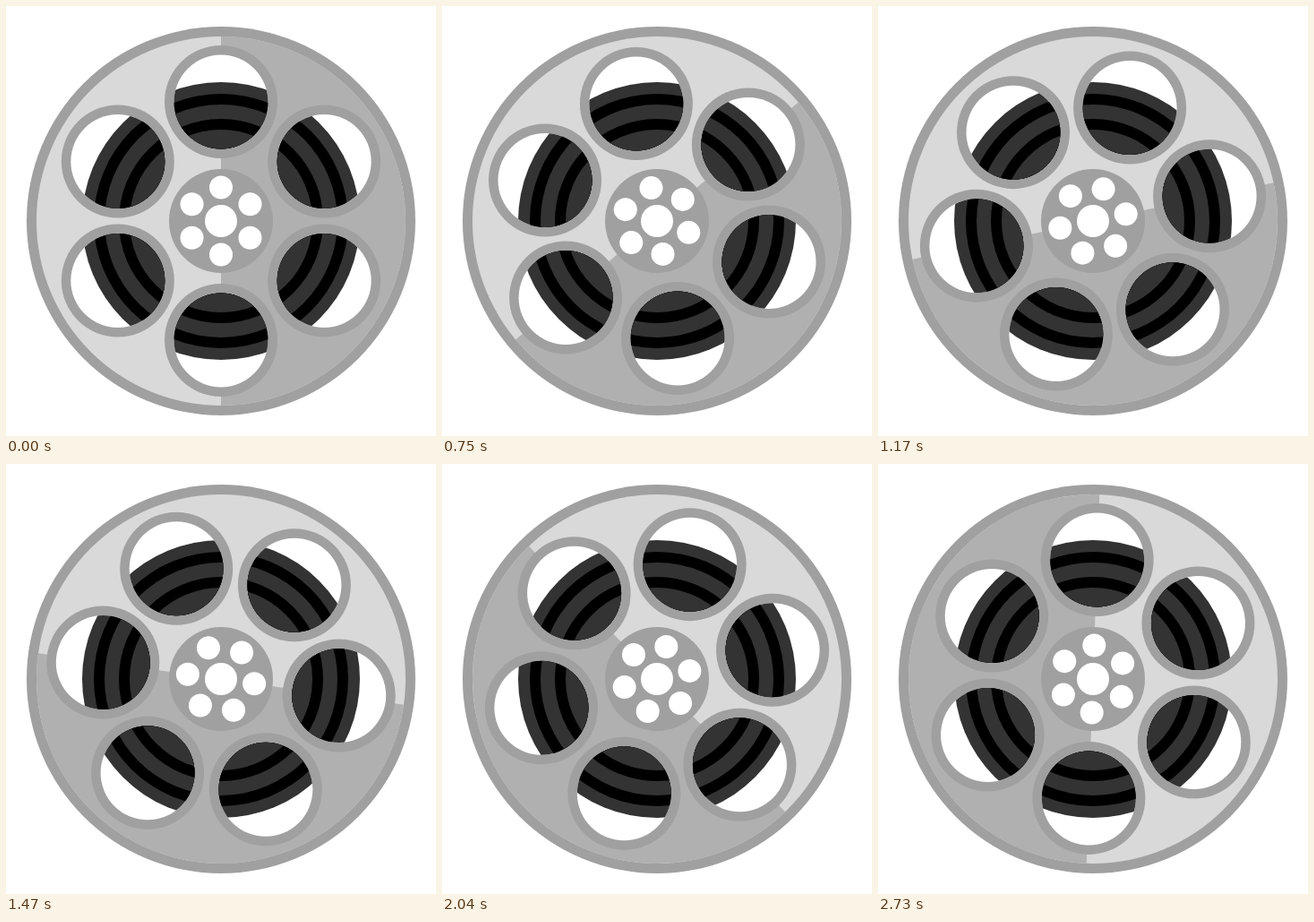
These frames come from a looping animation (480x480 px, 2760 ms). An HTML page with a canvas:

```html
<!DOCTYPE html>
<html lang="en">
<head>
<meta charset="utf-8">
<title>Film reel</title>
<style>
  html, body { margin: 0; height: 100%; overflow: hidden; background: #fff; }
  canvas { display: block; width: 100vw; height: 100vh; object-fit: contain; }
</style>
</head>
<body>
<canvas width="480" height="480"></canvas>
<script>
const ctx = document.querySelector('canvas').getContext('2d');
const LOOP = 2760, STEP = 30, DEGREES_PER_STEP = 2;
const RIM = '#a0a0a0', LIGHT = '#d9d9d9', SHADE = '#b0b0b0', FILM = '#333', WHITE = '#fff';

function disc(x, y, r, color) {
  ctx.fillStyle = color;
  ctx.beginPath();
  ctx.arc(x, y, r, 0, 2 * Math.PI);
  ctx.fill();
}

// Six points evenly spread around the centre, the first at the top.
function sixAround(distance, turn) {
  return Array.from({ length: 6 }, (_, i) => {
    const a = turn + i * Math.PI / 3;
    return [distance * Math.sin(a), -distance * Math.cos(a)];
  });
}

function drawPlate(turn) {
  disc(0, 0, 217, RIM);
  disc(0, 0, 206, LIGHT);
  ctx.fillStyle = SHADE;
  ctx.beginPath();
  ctx.arc(0, 0, 206, turn - Math.PI / 2, turn + Math.PI / 2);
  ctx.fill();
}

function drawWindows(turn) {
  const centers = sixAround(133, turn);
  for (const [x, y] of centers) disc(x, y, 63, RIM);
  for (const [x, y] of centers) disc(x, y, 52.5, WHITE);

  // The wound film does not turn; it shows only through the windows.
  ctx.save();
  ctx.beginPath();
  for (const [x, y] of centers) {
    ctx.moveTo(x + 52.5, y);
    ctx.arc(x, y, 52.5, 0, 2 * Math.PI);
  }
  ctx.clip();
  [155, 142, 130, 114, 102].forEach((r, i) => disc(0, 0, r, i % 2 ? '#000' : FILM));
  ctx.restore();
}

function drawHub(turn) {
  disc(0, 0, 58, RIM);
  disc(0, 0, 18, WHITE);
  for (const [x, y] of sixAround(37.5, turn)) disc(x, y, 13, WHITE);
}

function frame() {
  const step = Math.floor(performance.now() % LOOP / STEP);
  const turn = step * DEGREES_PER_STEP * Math.PI / 180;
  ctx.setTransform(1, 0, 0, 1, 240, 240);
  ctx.fillStyle = WHITE;
  ctx.fillRect(-240, -240, 480, 480);
  drawPlate(turn);
  drawWindows(turn);
  drawHub(turn);
  requestAnimationFrame(frame);
}
frame();
</script>
</body>
</html>
```
